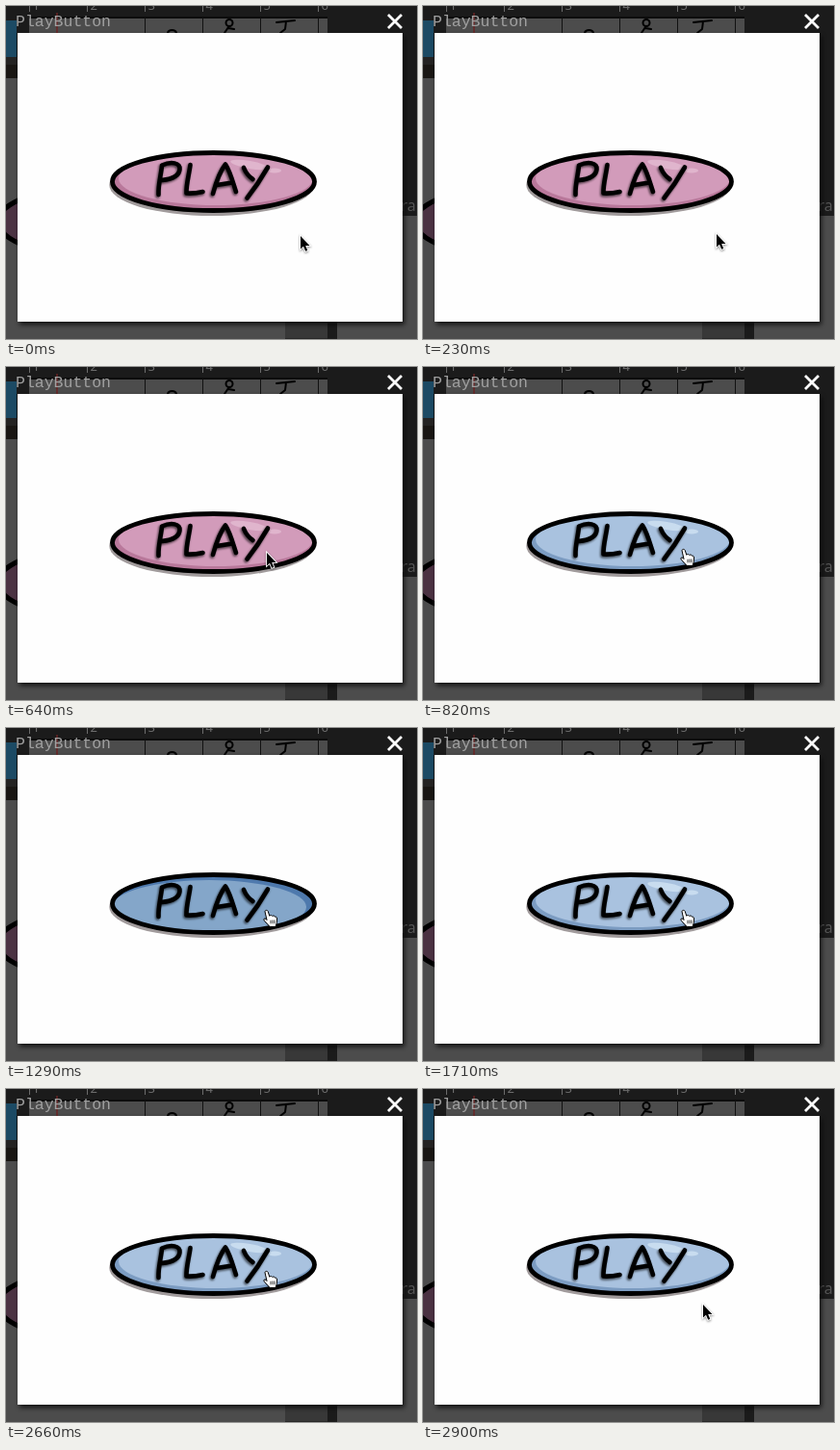
These frames come from a looping animation (427 by 346 pixels, 3 s). An HTML page:

```html
<!DOCTYPE html>
<html lang="en">
<head>
<meta charset="utf-8">
<title>Play button</title>
<style>
  html, body { margin: 0; width: 100%; height: 100%; overflow: hidden; background: #1b1b1b; }
  svg { display: block; width: 427px; height: 346px; }
  .line { fill: none; stroke: #000; stroke-linecap: round; stroke-linejoin: round; }
  #dialog { filter: drop-shadow(2px 3px 2.5px rgba(0, 0, 0, .75)); }
  #arrow { filter: drop-shadow(0 1px 1px rgba(0, 0, 0, .45)); }
  #button { --face: #d29bba; --rim: #b9789b; --shine: #e0b5cd; }
  #button.hover { --face: #a9c2df; --rim: #7c9cc2; --shine: #c8dcef; }
  #button.down { --face: #84a6c9; --rim: #4e79ad; --shine: none; }
  #rim { fill: var(--rim); }
  #face { fill: var(--face); }
  #shine { fill: var(--shine); }
</style>
</head>
<body>
<svg viewBox="0 0 427 346">
  <defs>
    <clipPath id="inside"><ellipse cx="215.5" cy="182.5" rx="105" ry="30"/></clipPath>
    <filter id="soft"><feGaussianBlur stdDeviation="1"/></filter>
    <path id="letters" d="M162 166C161 176 158 186 158.500 196M162 165.500C172 161 181 163 180.500 169.500 180 177 171 180 162 181M191.500 165C190 176 187 186 187.500 194.500 194 195 200 194 204.500 193M215 195C218 184 222 172 228 164.500 233 172 236 184 239 193M219 186 235 183.500M247 168C249 173 252 177 256.500 180M272 167.500C266 178 258 190 250.500 199.500"/>
  </defs>

  <!-- dimmed editor behind the dialog -->
  <rect width="427" height="346" fill="#1b1b1b"/>
  <rect x="24" y="11" width="310" height="2" fill="#0c0c0c"/>
  <rect x="24" y="13" width="310" height="16" fill="#4c4c4c"/>
  <g id="ruler" font-family="'Noto Sans', sans-serif" font-size="13" fill="#6c6c6c"></g>
  <path d="M53 7V28" stroke="#6b2424" stroke-width="1.500"/>
  <g class="line" stroke-width="2">
    <path d="M168 28C169 24 176 24 177 28M231 22 227 28M231 23 237 24"/>
    <circle cx="232" cy="17.500" r="3.500"/>
    <path d="M281 17 300 15M291 16 290 24 285 28"/>
  </g>
  <rect y="15" width="11" height="38" fill="#1c4a64"/>
  <rect y="53" width="12" height="8" fill="#242322"/>
  <rect y="61" width="12" height="14" fill="#191613"/>
  <rect y="75" width="12" height="271" fill="#4c4c4c"/>
  <ellipse cx="90" cy="224" rx="98" ry="36" fill="#4b3242" stroke="#000" stroke-width="5"/>
  <text x="410.500" y="213" font-family="'Noto Sans', sans-serif" font-size="16" fill="#555">ra</text>
  <rect x="344" y="218" width="83" height="128" fill="#4c4c4c"/>
  <rect y="326" width="290" height="20" fill="#4c4c4c"/>
  <rect x="290" y="326" width="44" height="20" fill="#383838"/>
  <path d="M290 345.500H334" stroke="#262626"/>

  <rect id="dialog" x="12" y="28" width="400" height="300" fill="#fefefe"/>
  <text x="10" y="21" font-family="'Liberation Mono', monospace" font-size="16.500" fill="#a0a0a0">PlayButton</text>
  <path d="M397 9 411 23M411 9 397 23" stroke="#fff" stroke-width="2.800"/>

  <g id="button">
    <ellipse cx="213.800" cy="186" rx="106.500" ry="32" fill="#a09a9b"/>
    <ellipse id="rim" cx="215.500" cy="182.500" rx="105" ry="30"/>
    <g clip-path="url(#inside)">
      <ellipse id="face" rx="101" ry="28"/>
      <g id="shine">
        <ellipse cx="253" cy="165" rx="20" ry="4" transform="rotate(10 253 165)"/>
        <ellipse cx="279" cy="171" rx="7" ry="2.500"/>
      </g>
    </g>
    <ellipse class="line" cx="215.500" cy="182.500" rx="105" ry="30" stroke-width="4.800"/>
    <use href="#letters" class="line" x="-1" y="1.500" stroke-width="5" opacity=".6" filter="url(#soft)"/>
    <use href="#letters" class="line" stroke-width="4.600"/>
  </g>

  <path id="arrow" d="M0 0V13.500L3 10.700 5.200 15.800 7.300 14.900 5.200 9.900H9.500Z" stroke="#fff" stroke-width="1.800" paint-order="stroke"/>
  <g id="hand" stroke="#000" stroke-linejoin="round">
    <path fill="#fff" d="M0 8.500-2-.3C-2-1.800.6-2.200 1.200-.6L2.800 4.300C3.600 3.200 5.200 3.300 5.700 4.500 6.600 3.700 8 4 8.400 5.200 9.600 4.800 10.500 5.600 10.600 7L10.300 11.500 9 15.500H3.200L-2.700 9.300C-4 7.300-2.300 6.300-1 7.300Z"/>
    <path fill="none" stroke-width=".8" d="M4 8.700V12.300M6 8.500V12.300M8 8.500V12.300"/>
  </g>
</svg>
<script>
const $ = id => document.getElementById(id);
const clamp = (v, lo, hi) => Math.min(hi, Math.max(lo, v));
const LOOP = 3000;

$("ruler").innerHTML = [1, 2, 3, 4, 5, 6].map((n, i) => {
  const x = 24.5 + 60 * i;
  const divider = i > 1 ? `<path d="M${x} 12V28" stroke="#111"/>` : "";
  return `<path d="M${x} 0V6" stroke="#6c6c6c"/><text x="${x + 3}" y="4">${n}</text>${divider}`;
}).join("");

// The pointer is sampled in discrete steps on its way in and out.
function pointerAt(t) {
  if (t < 700) {
    const u = clamp(Math.floor((t - 120) / 57.7) + 1, 0, 10) / 10;
    return { x: 306 - 35 * u ** 2.57, y: 239 - 46 * u ** 1.83, hand: false };
  }
  const v = clamp(Math.floor((t - 2660) / 60), 0, 4) / 4;
  return { x: 271 + 20 * v, y: 191 + 33 * v, hand: v < 0.75 };
}

function draw(t) {
  const down = (t >= 1290 && t < 1710) || (t >= 2250 && t < 2660);
  $("button").setAttribute("class", down ? "down" : t >= 700 ? "hover" : "");
  $("face").setAttribute("transform", down ? "translate(211 186)" : "translate(218 179)");

  const { x, y, hand } = pointerAt(t);
  for (const id of ["arrow", "hand"]) {
    $(id).setAttribute("transform", `translate(${Math.round(x)} ${Math.round(y)})`);
    $(id).setAttribute("visibility", (id === "hand") === hand ? "visible" : "hidden");
  }
}

const start = performance.now();
function tick() {
  draw((performance.now() - start) % LOOP);
  requestAnimationFrame(tick);
}
tick();
</script>
</body>
</html>
```
